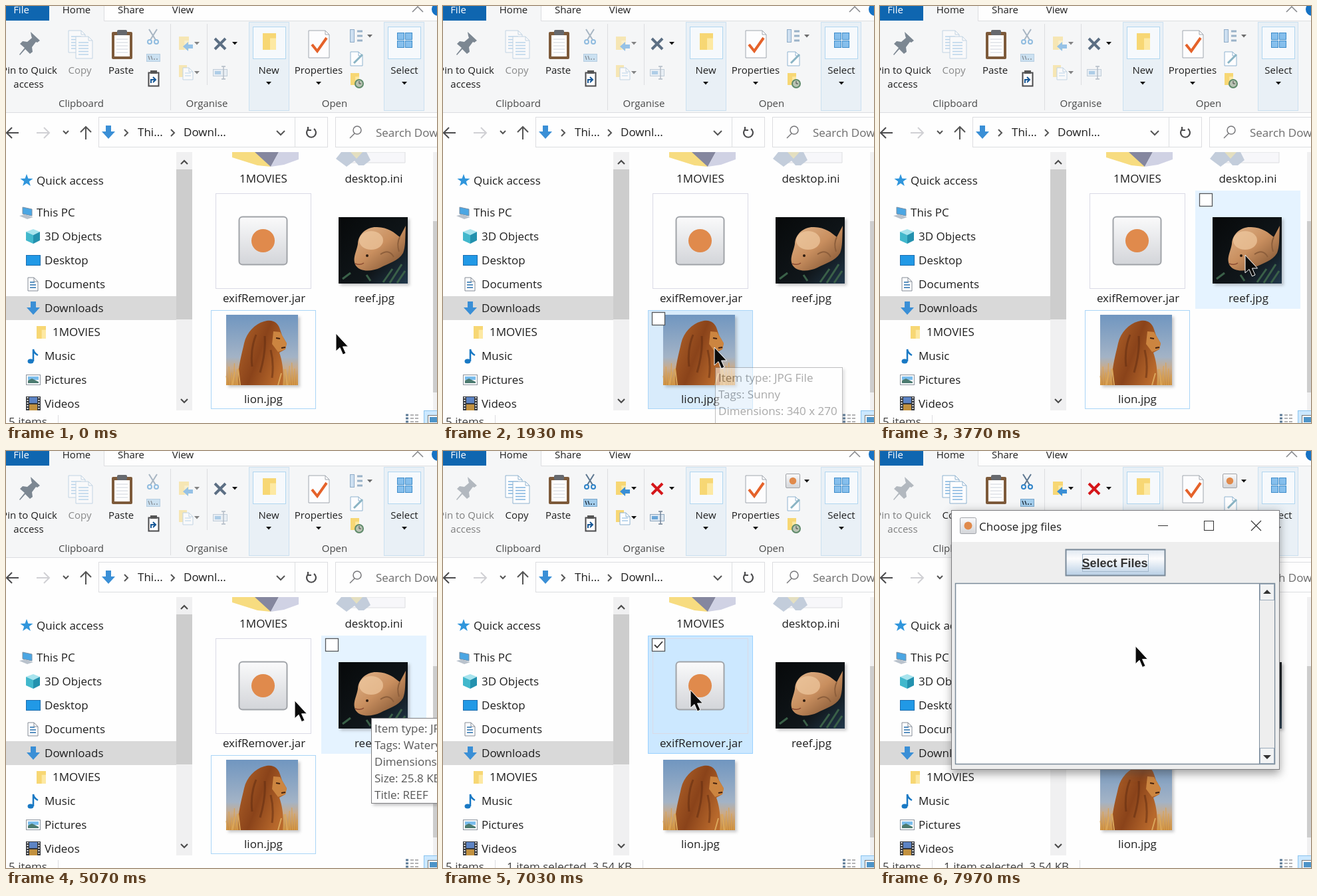
Animation, 648 px wide and 628 px high, one loop 8 s. Source, as an HTML page:

```html
<!DOCTYPE html>
<html lang="en">
<head>
<meta charset="utf-8">
<title>File manager</title>
<style>
html, body { margin: 0; width: 100%; height: 100%; overflow: hidden; background: #fefefe; }
svg { display: block; width: 648px; height: 628px; font: 17px "Open Sans", "Noto Sans", sans-serif; }
text { white-space: pre; }
</style>
</head>
<body>
<svg id="stage" viewBox="0 0 648 628" xmlns="http://www.w3.org/2000/svg"></svg>
<script>
const INK = '#1e1e1e', PAPER = '#fefefe', BAR = '#f5f6f7', EDGE = '#dcdde0';
const BLUE = '#3a8fd6', TRACK = '#f0f0f1', THUMB = '#cdcdcd', LOOP = 8000;

// Markup helpers
const rect = (x, y, w, h, fill, more = '') =>
  `<rect x="${x}" y="${y}" width="${w}" height="${h}" fill="${fill}" ${more}/>`;
const box = (x, y, w, h, fill, stroke, more = '') =>
  rect(x + .5, y + .5, w - 1, h - 1, fill, `stroke="${stroke}" ${more}`);
const shape = (d, fill, more = '') => `<path d="${d}" fill="${fill}" ${more}/>`;
const line = (d, stroke = INK, width = 1, more = '') =>
  `<path d="${d}" fill="none" stroke="${stroke}" stroke-width="${width}" ${more}/>`;
const text = (x, y, s, more = '') => `<text x="${x}" y="${y}" fill="${INK}" ${more}>${s}</text>`;
const mid = (x, y, s, more = '') => text(x, y, s, 'text-anchor="middle" ' + more);
const label = (x, y, s, more = '') => mid(x, y, s, 'font-size="15" ' + more);
const group = (id, body, more = '') => `<g id="${id}" ${more}>${body}</g>`;
const drop = (x, y, fill = '#111') => shape(`M${x - 4} ${y - 2}h8l-4 4.5z`, fill);
const page = (x, y, w, h, stroke = '#8fb3d0') =>
  shape(`M${x} ${y}h${w - 6}l6 6v${h - 6}h${-w}z`, '#fdfdfe', `stroke="${stroke}"`) +
  line(`M${x + w - 6} ${y}v6h6`, stroke);
const folder = (x, y, w, h) =>
  rect(x, y, w, h, '#f7d774') + rect(x + w * .55, y + h * .3, w * .45, h * .7, '#fde9a3');
const downArrow = (x, y) =>
  shape(`M${x - 4} ${y - 10}h8v9h6l-10 11l-10 -11h6z`, BLUE);
const appTile = (x, y, s) =>
  rect(x + .5, y + .5, s - 1, s - 1, 'url(#tile)', `rx="${s * .07}" stroke="#a0a3a8" stroke-width="${s > 40 ? 2 : 1}"`) +
  `<circle cx="${x + s / 2}" cy="${y + s / 2}" r="${s * .24}" fill="#e08a4c"/>`;

const defs = `<defs>
  <linearGradient id="tile" x2="0" y2="1"><stop stop-color="#fafafb"/><stop offset="1" stop-color="#d3d5d9"/></linearGradient>
  <linearGradient id="steel" x2="0" y2="1"><stop stop-color="#dfe8f1"/><stop offset=".35" stop-color="#fcfcfd"/><stop offset="1" stop-color="#b8cfe5"/></linearGradient>
  <linearGradient id="sky" x2="0" y2="1"><stop stop-color="#7096c0"/><stop offset=".6" stop-color="#a3b3c6"/><stop offset=".76" stop-color="#c9ab8c"/><stop offset="1" stop-color="#c98a3c"/></linearGradient>
  <linearGradient id="mane" x2="1" y2=".5"><stop stop-color="#b3652a"/><stop offset=".55" stop-color="#8a431a"/><stop offset="1" stop-color="#b8692c"/></linearGradient>
  <linearGradient id="deep" x2="1" y2="1"><stop stop-color="#07090a"/><stop offset=".65" stop-color="#10161a"/><stop offset="1" stop-color="#22394c"/></linearGradient>
  <linearGradient id="scale" x2=".9" y2="1"><stop stop-color="#e0b58c"/><stop offset=".5" stop-color="#c98f5f"/><stop offset="1" stop-color="#7b5030"/></linearGradient>
  <filter id="soft" x="-20%" y="-20%" width="140%" height="140%"><feGaussianBlur stdDeviation="7"/></filter>
  <filter id="faint" x="-20%" y="-20%" width="140%" height="140%"><feGaussianBlur stdDeviation="2"/></filter>
  <clipPath id="pane"><rect y="220" width="648" height="389"/></clipPath>
</defs>`;

function tabs() {
  return rect(65, 0, 82, 24, BAR) + rect(0, 22, 648, 139, BAR) +
    line('M147.5 0V22.5H648M0 160.5H648', EDGE) + rect(0, 0, 65, 22, '#0f66b0') +
    label(23, 11, 'File', 'style="fill:#fff"') + label(106, 11, 'Home') +
    label(188, 11, 'Share') + label(266, 11, 'View') +
    line('M611 9l8 -8l8 8', '#86888c', 1.6) + '<circle cx="650" cy="5" r="10" fill="#1672c4"/>';
}

function ribbon() {
  const pin = shape('M37 39l14 13l-4 3l-2 -1l-6 8l1 7l-4 3l-7 -7l-8 9l-1 -1l8 -10l-7 -6l4 -4l7 1l7 -6l-1 -3z', '#7c8792') +
    text(77, 102, 'Pin to Quick', 'font-size="15" text-anchor="end"') + label(34, 123, 'access');
  const copyRows = (x, y) => line([0, 1, 2, 3, 4].map(i => `M${x} ${y + i * 4.5}h15`).join(''), '#7fb2de', 1.5);
  const copy = page(94, 37, 25, 33) + copyRows(98, 46) + page(105, 46, 25, 33) + copyRows(109, 55) +
    label(111, 102, 'Copy');
  const clip = rect(159, 39, 31, 41, '#7d5a3a', 'rx="2"') + rect(163, 44, 23, 32, '#fff') +
    rect(167, 36, 15, 8, '#66696e', 'rx="2"') +
    line([0, 1, 2, 3, 4].map(i => `M166 ${50 + i * 5}h17`).join(''), '#cdd2da');
  const cut = line('M215 35l10 16M227 35l-10 16', '#5d7790', 2) +
    '<g fill="none" stroke="#2e83c8" stroke-width="2"><circle cx="216" cy="54" r="3"/><circle cx="226" cy="54" r="3"/></g>' +
    box(211, 72, 21, 12, '#a3cdec', '#78a6cc') + line('M214 75l2 6M218 75l2 6M222 80h2M226 80h2', '#234', 1.4);
  const link = box(214, 100, 16, 21, '#fdfdfe', '#4a4a4c', 'stroke-width="2"') +
    rect(217, 97, 10, 5, '#555') + line('M218 116v-5h6M221 107l4 4l-4 4', '#165796', 2);
  const move = folder(260, 46, 15, 20) + shape('M266 61l8 -7v4h7v6h-7v4z', BLUE) +
    folder(260, 89, 12, 18) + page(266, 93, 15, 18) + line('M269 101h9M269 105h9', '#7fb2de') +
    drop(287, 56) + drop(287, 100);
  const rename = box(311, 95, 22, 11, '#dde8f2', '#8ea6bd') + rect(314, 98, 9, 5, '#6aa6d8') +
    line('M324 91h6M327 91v19M324 110h6', '#6f8094', 1.4);
  const edit = page(518, 69, 18, 21) + line('M523 86l13 -13', '#8ab4c4', 3);
  const past = folder(518, 101, 13, 18) + '<circle cx="531" cy="117" r="6" fill="#b9c4b4" stroke="#5f8a6a" stroke-width="2"/>' +
    line('M531 113v4h3', '#444');
  const sort = box(517, 35, 7, 20, '#cddff0', '#90acc8') +
    line('M528 38h8M528 45h8M528 52h8', '#9ab2c8', 3);
  const panel = x => box(x, 24, 61, 134, '#e9f0f6', '#cbe0f0') + box(x + 6, 31, 50, 49, '#f6f9fc', '#b0d6f0');
  const grid = [588, 600].map(x => [40, 52].map(y => box(x, y, 11, 11, '#86bfec', '#3d8cca')).join('')).join('');
  return line('M247.5 27V157M302.5 27V119', EDGE) +
    group('pin', pin) + group('copy', copy) + clip + label(173, 102, 'Paste') + group('cut', cut) + link +
    label(113, 152, 'Clipboard', 'opacity=".8"') + group('move', move) +
    group('del', line('M314 49l16 16M330 49l-16 16', 'currentColor', 4)) + drop(344, 56) + group('rename', rename) +
    label(302, 152, 'Organise', 'opacity=".8"') +
    panel(365) + folder(386, 41, 20, 25) + label(395, 102, 'New') + drop(395, 116) +
    page(455, 37, 31, 41, '#a0a6ae') + line('M460 58l8 10l14 -20', '#e5622a', 4) +
    label(470, 102, 'Properties') + drop(470, 116) +
    group('sort', sort) + group('openApp', appTile(515, 34, 22)) + group('openDrop', drop(547, 45)) + edit + past +
    label(494, 152, 'Open', 'opacity=".8"') +
    panel(568) + grid + label(599, 102, 'Select') + drop(599, 116);
}

function address() {
  return line('M19 191H1M9 183l-8 8l8 8', '#4b4b4d', 2) + line('M46 191h18M57 183l8 8l-8 8', '#d0d0d4', 2) +
    line('M86 188l4 4l4 -4', '#555', 2) + line('M120 201V182M112 190l8 -8l8 8', '#555', 2) +
    box(139, 167, 345, 46, PAPER, EDGE) + downArrow(154, 190) +
    line('M178 186l5 5l-5 5M248 186l5 5l-5 5', '#555', 2) + text(198, 196, 'Thi...') + text(267, 196, 'Downl...') +
    line('M407 188l6 6l6 -6', '#555', 2) + line('M434.5 168V212', EDGE) +
    line('M455 185a7 7 0 1 0 8 0M454 182v5h5', '#4b4b4d', 2.2) +
    box(495, 167, 170, 46, PAPER, EDGE) +
    '<circle cx="528" cy="187" r="6" fill="none" stroke="#77777a" stroke-width="1.5"/>' +
    line('M524 192l-7 7', '#77777a', 1.5) + text(556, 197, 'Search Downloads', 'opacity=".65"');
}

function sidebar() {
  const star = Array.from({ length: 10 }, (_, i) => {
    const r = i % 2 ? 4 : 10, a = i * Math.PI / 5 - Math.PI / 2;
    return `${31 + r * Math.cos(a)} ${263 + r * Math.sin(a)}`;
  }).join('L');
  const icons = shape(`M${star}z`, '#3096dc') +
    shape('M25 303l14 3v10l-14 -3z', '#4ba6e3', 'stroke="#7b90a4"') + shape('M20 316l8 -2l13 4l-9 3z', '#b9c2cc') +
    shape('M30 340l11 -4l10 4l-10 5z', '#a8e4ee') + shape('M30 340l11 5v13l-11 -5z', '#42b8cc') + shape('M51 340l-10 5v13l10 -5z', '#2391ae') +
    box(30, 375, 22, 16, '#2199e6', '#1a6cae') + page(33, 409, 15, 20, '#858c96') +
    line('M36 416h7M36 420h9M36 424h9', '#5a91c0', 2) +
    downArrow(41, 455) + folder(46, 482, 14, 19) +
    line('M41 535v-18q1 6 7 9', '#1979c4', 2.5) + '<ellipse cx="37" cy="535" rx="4.5" ry="3.5" fill="#1979c4"/>' +
    box(30, 555, 22, 16, '#f7f8fa', '#8d959e') + rect(33, 558, 16, 5, '#79bcec') + shape('M33 568v-4l6 -3l10 5v2z', '#4c7b70') +
    rect(30, 588, 22, 21, '#34373c') + rect(35, 589, 12, 9, '#5c83c4') + rect(35, 600, 12, 9, '#c2913f') +
    line('M32.5 589V610M49.5 589V610', '#f0f0f0', 2, 'stroke-dasharray="2 2"');
  const rows = ['3D Objects', 'Desktop', 'Documents', 'Downloads', '1MOVIES', 'Music', 'Pictures', 'Videos'];
  return rect(0, 437, 256, 36, '#d9d9d9') + icons + text(46, 269, 'Quick access') + text(46, 317, 'This PC') +
    rows.map((s, i) => text(i === 4 ? 70 : 58, 353 + i * 36, s)).join('') +
    rect(256, 220, 24, 389, TRACK) + rect(256, 246, 24, 226, THUMB) +
    line('M263 238l5 -5l5 5M263 592l5 5l5 -5', '#4c4c4c', 2.2);
}

const check = (id, x, y) => group(id, box(x, y, 20, 20, '#fff', '#55575a', 'stroke-width="1.3"'));
const shadowed = (x, y, w, h) => rect(x + 3, y + 3, w, h, '#77777a', 'opacity=".4" filter="url(#faint)"');

function lionPhoto() {
  const grass = Array.from({ length: 34 }, (_, i) => `M${333 + i * 3.15} 571l${i % 5 - 2} ${-14 - i * 37 % 23}`).join('');
  return shadowed(331, 465, 108, 106) + rect(331, 465, 108, 106, 'url(#sky)') +
    line(grass, '#dba24e', 1.3, 'opacity=".75"') +
    shape('M350 571C347 548 354 527 358 508C362 491 374 479 388 475C400 471 409 476 412 487L415 496L422 508L420 517L411 522C416 536 418 554 416 571z', 'url(#mane)') +
    shape('M402 490l10 1l10 17l-2 9l-11 4l-9 -12z', '#cc8540') +
    line('M406 500l6 1M414 515l6 -1', '#42210f', 2) +
    line('M376 495q-9 22 -6 48M389 497q2 24 -7 55M398 518q5 20 2 42', '#5e2b10', 3, 'opacity=".5"') +
    line('M340 571l4 -20M352 571l-3 -25M409 571l5 -18M423 571l-3 -24', '#dba75b', 2);
}

function reefPhoto() {
  return shadowed(500, 318, 104, 100) + rect(500, 318, 104, 100, 'url(#deep)') +
    line('M567 416l14 -20M577 417l18 -28M588 417l12 -18M506 411l12 -9M548 414l-6 -9', '#3a6048', 3) +
    shape('M526 391C520 380 527 371 529 358C530 342 544 332 558 333C574 333 585 342 592 348L601 331C600 350 601 362 597 372C590 384 574 388 563 394C550 400 533 401 526 391z', 'url(#scale)') +
    '<ellipse cx="549" cy="353" rx="18" ry="14" fill="#efc9a0" opacity=".7"/>' +
    line('M563 374q13 -9 20 4M592 348q-5 10 -1 22', '#8d5f3c', 2) +
    '<circle cx="543" cy="376" r="2" fill="#2d1c10"/>' + line('M525 388q8 3 13 -1', '#8a4a31', 1.5);
}

function files() {
  const peeks = shape('M340 220h40l18 22l-20 -2l-38 -12z', '#f7dc80') + shape('M374 220h36l-12 22z', '#85879f') +
    shape('M398 242l12 -22h30v11l-22 8z', '#d0d2e4') +
    shape('M505 220h95v16h-88z', '#f7f7fa', `stroke="${EDGE}"`) + shape('M496 230l8 -10h38l6 12l-10 8h-8l-6 -7l-12 9z', '#c3cddb') +
    shape('M518 220h18l-9 10z', '#e4dfc0');
  return peeks + mid(387, 266, '1MOVIES') + mid(553, 266, 'desktop.ini') +
    group('jarBack', rect(308, 278, 158, 178, 'currentColor')) +
    group('jarEdge', box(308, 278, 158, 178, 'none', '#99d1ff')) +
    group('swimBack', rect(474, 278, 158, 178, '#e5f3ff')) +
    group('lionBack', rect(308, 458, 158, 149, '#d8ebfb')) +
    group('lionEdge', box(308, 458, 158, 149, 'none', '#a9d5f7')) +
    box(315, 282, 144, 144, 'none', '#dadae6') + appTile(350, 317, 73) + mid(388, 446, 'exifRemover.jar') +
    reefPhoto() + mid(554, 446, 'reef.jpg') + lionPhoto() + mid(387, 598, 'lion.jpg') +
    check('jarCheck', 314, 282) + group('tick', line('M318 292l4 4l8 -9', '#333', 1.8)) +
    check('swimCheck', 480, 282) + check('lionCheck', 314, 461) +
    rect(642, 220, 6, 389, TRACK) + rect(642, 324, 6, 258, THUMB);
}

function status() {
  return text(4, 632, '5 items', 'opacity=".85"') + line('M78.5 616V628', EDGE) +
    group('picked', text(96, 632, '1 item selected  3.54 KB', 'opacity=".85"') + line('M300.5 616V628', EDGE)) +
    line('M601 616h4M601 621h4M601 626h4', '#5c7a96', 3) + line('M608 616h5M615 616h5M608 621h5M615 621h5M608 626h5M615 626h5', '#66666a') +
    box(628, 609, 24, 24, '#cce8ff', '#8bc4ee') + box(634, 616, 18, 16, '#fafafa', '#777') + rect(637, 619, 14, 8, '#4d94c8');
}

function tip(id, x, y, w, lines) {
  const rows = lines.map((s, i) => text(x + 5, y + 22 + i * 25, s, 'style="fill:#575757"')).join('');
  return group(id, shadowed(x, y, w, 129) + box(x, y, w, 129, PAPER, '#808083') + rows);
}

function dialog() {
  const frame = rect(108, 92, 493, 394, '#444', 'opacity=".5" filter="url(#soft)"') +
    box(107, 89, 494, 391, '#eeeeee', '#7d7d80') + rect(108, 90, 492, 47, PAPER);
  const buttons = line('M418 112.5h15M558 105l15 15M573 105l-15 15', '#333', 1.2) + box(487, 105, 15, 15, 'none', '#333');
  const select = box(279, 148, 150, 40, 'url(#steel)', '#7a8a99', 'stroke-width="2"') + box(304, 155, 100, 27, 'none', '#a3b8cc') +
    mid(353, 175, '<tspan text-decoration="underline">S</tspan>elect Files',
      'font-family="Liberation Sans, Arial, sans-serif" font-weight="bold" font-size="18" style="fill:#333"');
  const area = box(113, 199, 481, 273, PAPER, '#7a8a99', 'stroke-width="1.5"') +
    box(570, 199, 24, 273, '#eeeeee', '#7a8a99') + box(571, 200, 22, 25, '#f2f3f4', '#9cacbc') + box(571, 447, 22, 24, '#f2f3f4', '#9cacbc') +
    shape('M576 215l6 -6l6 6zM576 458h12l-6 6z', '#333');
  return group('dialog', frame + appTile(120, 100, 25) + text(149, 120, 'Choose jpg files') + buttons + select + area);
}

const stage = document.getElementById('stage');
stage.innerHTML = defs + rect(0, 0, 648, 628, PAPER) + tabs() + ribbon() + address() +
  `<g clip-path="url(#pane)">${sidebar()}${files()}</g>` + status() +
  tip('lionTip', 409, 544, 192, ['Item type: JPG File', 'Tags: Sunny', 'Dimensions: 340 x 270', 'Size: 19.6 KB']) +
  tip('swimTip', 549, 402, 192, ['Item type: JPG File', 'Tags: Watery', 'Dimensions: 275 x 183', 'Size: 25.8 KB', 'Title: REEF']) +
  dialog() +
  group('pointer', shape('M0 0V27L6 21.5L10.5 32L15 30L10.5 20H18.5z', '#0b0b0b', 'stroke="#fefefe" stroke-width="1"'));

const el = Object.fromEntries([...stage.querySelectorAll('g[id]')].map(g => [g.id, g]));

const clamp = v => Math.max(0, Math.min(1, v));
const ramp = (t, start, span) => clamp((t - start) / span);
const smooth = k => k * k * (3 - 2 * k);
const speedUp = k => k * k;
const slowDown = k => k * (2 - k);
const fade = (id, v) => { el[id].setAttribute('opacity', v); };
const show = (id, on) => fade(id, on ? 1 : 0);

// Pointer stops: time, x, y, easing into the stop; the last move runs past the loop's end
const stops = [
  [0, 496, 493], [830, 496, 493, smooth], [1300, 408, 514, smooth],
  [3130, 408, 514, smooth], [3550, 549, 375, smooth],
  [4850, 549, 375, smooth], [5070, 435, 376, speedUp], [5200, 372, 360, slowDown],
  [7700, 372, 360, smooth], [8240, 396, 228, smooth]
];

// Hover follows the pointer with a short lag; the ribbon updates after the click
const HOVER = { lion: 1080, swim: 3350, jar: 5120 };
const CLICK = 5730, RIBBON = 5900, OPEN = 7270;

function pointerAt(t) {
  const i = stops.findIndex((s, n) => n > 0 && t <= s[0]);
  const [t0, x0, y0] = stops[i - 1], [t1, x1, y1, ease] = stops[i];
  const k = ease((t - t0) / (t1 - t0));
  return [x0 + (x1 - x0) * k, y0 + (y1 - y0) * k];
}

function draw(t) {
  const onLion = t >= HOVER.lion && t < HOVER.swim;
  const onSwim = t >= HOVER.swim && t < HOVER.jar;
  const onJar = t >= HOVER.jar;
  const picked = t >= CLICK, active = t >= RIBBON;

  el.pointer.setAttribute('transform', `translate(${pointerAt(t)})`);
  for (const id of ['lionBack', 'lionCheck']) show(id, onLion);
  for (const id of ['swimBack', 'swimCheck']) show(id, onSwim);
  for (const id of ['jarBack', 'jarCheck']) show(id, onJar);
  for (const id of ['jarEdge', 'tick', 'picked']) show(id, picked);
  show('lionEdge', !picked);
  el.jarBack.setAttribute('color', picked ? '#cce8ff' : '#e5f3ff');

  show('openApp', active);
  show('sort', !active);
  for (const id of ['copy', 'cut', 'move', 'rename']) fade(id, active ? 1 : .5);
  fade('pin', active ? .55 : 1);
  fade('openDrop', active ? 1 : .6);
  el.del.setAttribute('color', active ? '#d5161a' : '#5c6f84');

  fade('lionTip', onLion ? ramp(t, 1850, 160) : 0);
  fade('swimTip', onSwim ? ramp(t, 4080, 160) : 0);

  const k = ramp(t, OPEN, 200), s = .9 + .1 * slowDown(k);
  fade('dialog', k);
  el.dialog.setAttribute('transform', `translate(354 285) scale(${s}) translate(-354 -285)`);
}

function frame(now) {
  draw(now % LOOP);
  requestAnimationFrame(frame);
}
draw(0);
requestAnimationFrame(frame);
</script>
</body>
</html>
```
